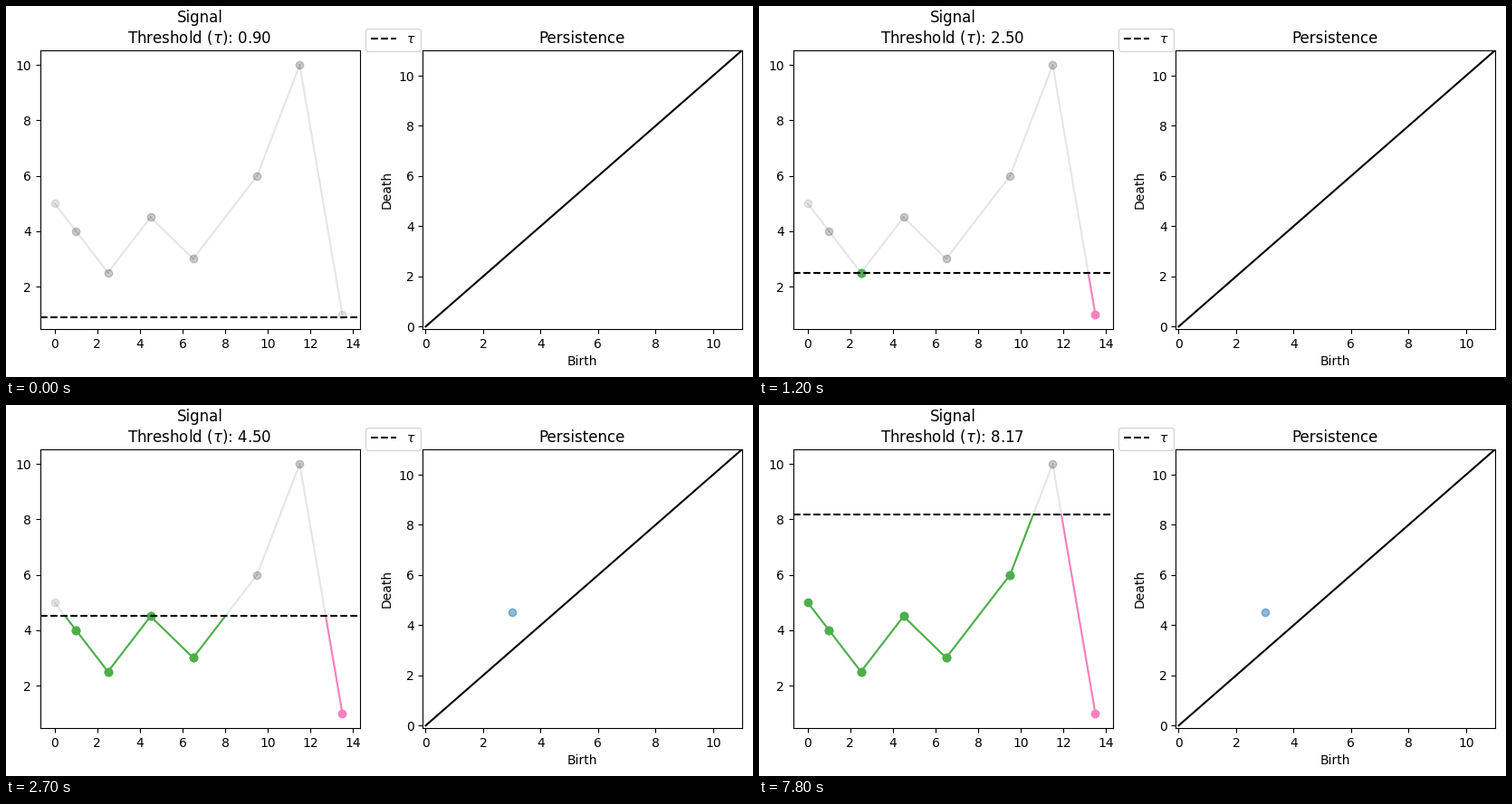
A matplotlib script for the animation above (8 s loop, 825 px wide and 410 px high).

```python
import numpy as np
import matplotlib.pyplot as plt
from matplotlib.animation import FuncAnimation
from matplotlib.patches import Rectangle

W, H, DPI = 825, 410, 100
TICK_MS, LOOP_MS = 100, 8000
STEP_MS, RESUME_MS = 300, 6300
DARK_STEP = 1

GREEN, ORANGE, PINK = "#4daf4a", "#ff7f00", "#f781bf"
MERGE = (3, 4.5)
xs = [0, 1, 2.5, 4.5, 6.5, 9.5, 11.5, 13.5]
ys = [5, 4, 2.5, 4.5, 3, 6, 10, 1]
points = list(zip(xs, ys))
segments = list(zip(points, points[1:]))
basins = [GREEN] * 3 + [ORANGE] * 3 + [PINK]
taus = np.concatenate([np.linspace(0.9, 4.5, 10), np.linspace(4.5, 10, 10)[1:]])

plt.rcParams["font.family"] = "DejaVu Sans"
# The small surplus keeps the pixel size from rounding down
fig = plt.figure(figsize=((W + 0.01) / DPI, (H + 0.01) / DPI), dpi=DPI)


def pixel_axes(left, right, top=49.3, bottom=357):
    return fig.add_axes([left / W, 1 - bottom / H, (right - left) / W, (bottom - top) / H])


signal = pixel_axes(37.5, 390.5)
signal.set(xlim=(-0.69, 14.31), ylim=(0.464, 10.52))
for (x0, y0), (x1, y1) in segments:
    signal.plot([x0, x1], [y0, y1], "o-", color="black", alpha=0.1)
pieces = [signal.plot([], [], "o-")[0] for _ in segments]
level = signal.axhline(taus[0], color="black", ls="--", label=r"$\tau$")
signal.legend(loc="center left", bbox_to_anchor=(1, 1.039))
title = signal.set_title("")

diagram = pixel_axes(460.3, 812.6)
diagram.set(xlim=(-0.1, 11), ylim=(-0.1, 11), xlabel="Birth", ylabel="Death")
diagram.set_title("Persistence")
diagram.plot([0, 11], [0, 11], color="black")
pair = diagram.scatter(*MERGE, color="tab:blue", alpha=0.5)

# Darkens the whole stage, white becoming 44/255
shade = fig.add_artist(Rectangle((-0.1, -0.1), 1.2, 1.2, transform=fig.transFigure,
                                 fc="black", lw=0, alpha=1 - 44 / 255, zorder=100))


def step_at(ms):
    if ms < RESUME_MS:
        return min(ms // STEP_MS, 9)
    return 10 + (ms - RESUME_MS) // STEP_MS


def draw_sublevel(piece, ends, tau, color):
    """Show the part of one segment that lies at or below tau."""
    (x0, y0), (x1, y1) = sorted(ends, key=lambda p: p[1])
    piece.set_visible(y0 <= tau + 1e-9)
    share = np.clip((tau - y0) / (y1 - y0), 0, 1)
    piece.set_data([x0, x0 + share * (x1 - x0)], [y0, y0 + share * (y1 - y0)])
    piece.set_markevery([0, 1] if share > 1 - 1e-9 else [0])
    piece.set_color(color)


def update(frame):
    step = step_at(frame * TICK_MS)
    tau = taus[step]
    dark = step == DARK_STEP
    merged = tau >= MERGE[1] - 1e-9
    for piece, ends, color in zip(pieces, segments, basins):
        if merged and color == ORANGE:
            color = GREEN
        draw_sublevel(piece, ends, tau, "#989898" if dark else color)
    level.set_ydata([tau, tau])
    title.set_text(f"Signal\nThreshold ($\\tau$): {tau:.2f}")
    pair.set_visible(merged)
    shade.set_visible(dark)
    return [*pieces, level, title, pair, shade]


anim = FuncAnimation(fig, update, frames=LOOP_MS // TICK_MS, interval=TICK_MS,
                     repeat=True, repeat_delay=0, blit=False)
plt.show()
```
